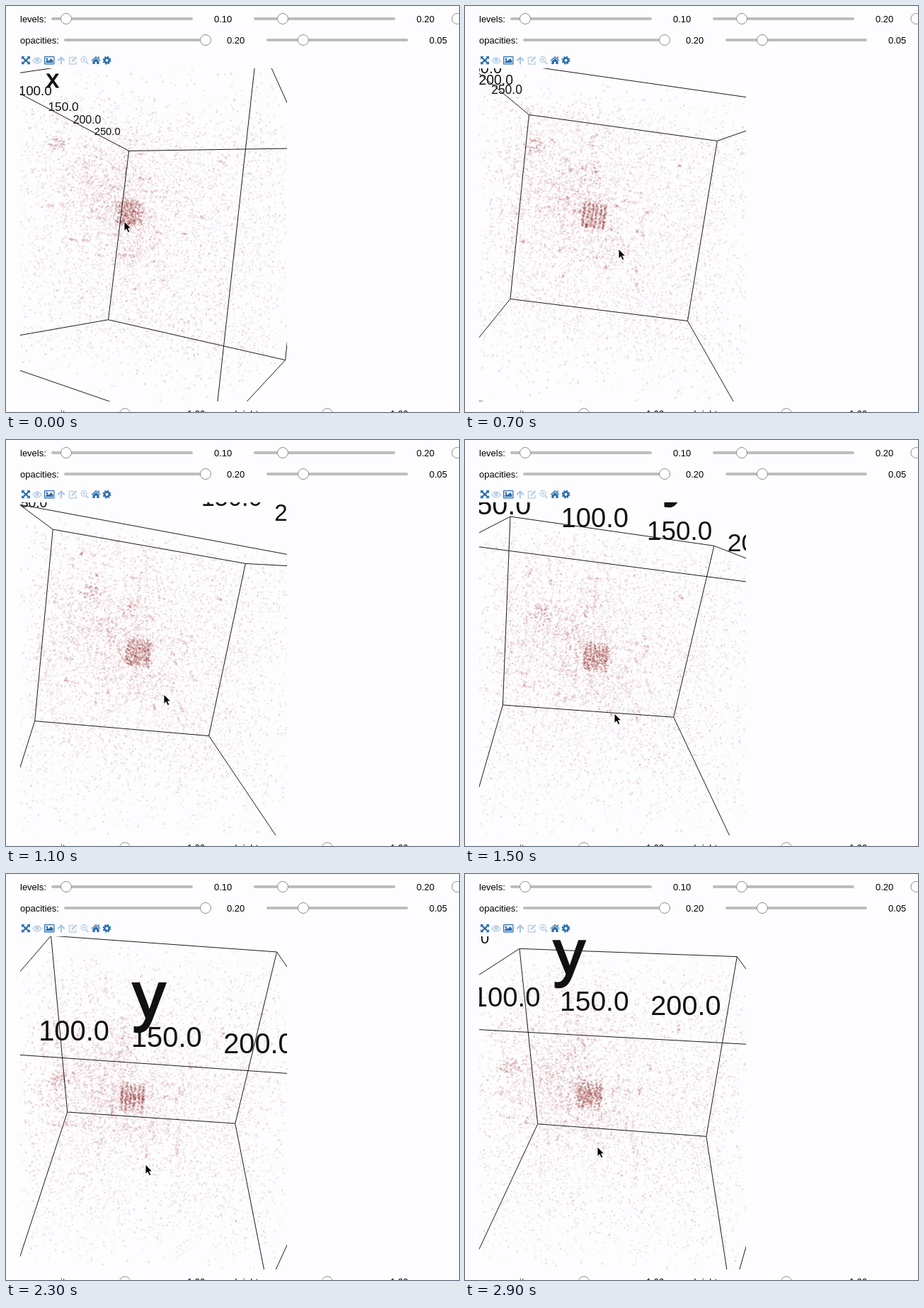
Recreate the animation shown at these times as an HTML page with a canvas. Size 640 by 573 pixels, loop 3000 ms.

```html
<!DOCTYPE html>
<html lang="en">
<head>
<meta charset="utf-8">
<title>Volume viewer</title>
<style>
html, body { margin: 0; width: 640px; height: 573px; overflow: hidden; background: #fdfcfe; }
canvas, svg { position: absolute; left: 0; top: 0; display: block; }
text { font-family: "Liberation Sans", Arial, sans-serif; }
.ui text { font-size: 13px; fill: #000; }
.title { stroke: #111; stroke-width: .03em; }
</style>
</head>
<body>
<canvas id="cloud" width="640" height="573"></canvas>
<svg id="stage" width="640" height="573" viewBox="0 0 640 573">
  <clipPath id="view"><rect x="20" y="88" width="377" height="470"/></clipPath>
  <g id="ui" class="ui"></g>
  <g id="icons" fill="#2a6fb0" stroke="none">
    <path d="M22 71h4.5l-1.4 1.4 2.9 2.9 2.9-2.9L29.500 71H34v4.500l-1.400-1.400-2.900 2.600 2.900 2.700L34 78v4.300h-4.500l1.400-1.400-2.900-2.700-2.900 2.700 1.400 1.400H22V78l1.400 1.400 2.900-2.700-2.900-2.600L22 75.500z"/>
    <g fill="none" stroke="#bcd2e8" stroke-width="1.5">
      <path d="M38 77q6-8 12 0q-6 8-12 0z"/><circle cx="44" cy="76.500" r="2" fill="#bcd2e8"/>
    </g>
    <path fill-rule="evenodd" d="M55 71h12.500q1 0 1 1v9.500q0 1-1 1H55q-1 0-1-1V72q0-1 1-1zM55.300 72.300v9h12v-9zM56.300 80.300v-2l2.300-2.300 1.500 1.500 3.500-3.500 2.800 2.800v3.500zM56.500 75a1.400 1.400 0 1 0 2.800 0a1.400 1.400 0 1 0-2.800 0z"/>
    <path fill="#a9c6e2" d="M78 71l5.500 5.500-1.500 1.500-3-2.800V82.500h-2V75.200L74 78l-1.500-1.500z"/>
    <g fill="none" stroke="#bcd2e8" stroke-width="1.400">
      <path d="M96 72.500H89.500v9.500H99V78"/><path d="M93 78.500l6.500-6.500" stroke-width="2.500"/>
      <circle cx="110" cy="75.500" r="4"/><path d="M108 75.500h4M110 73.500v4"/><path d="M113 78.500l3.500 3.500" stroke-width="2.200"/>
    </g>
    <path d="M127 71l6.500 5.700-.8.900L127 72.800l-5.700 4.800-.8-.9zM130 71.500h1.700v3l-1.700-1.500zM127 73.800l4.600 3.900V82h-3.300v-3.300h-2.600V82h-3.300v-4.300z"/>
    <circle cx="142.500" cy="76.700" r="3.300" fill="none" stroke="#2a6fb0" stroke-width="2.700"/>
    <circle cx="142.500" cy="76.700" r="5.100" fill="none" stroke="#2a6fb0" stroke-width="1.700" stroke-dasharray="2.200 1.805"/>
  </g>
  <g clip-path="url(#view)">
    <g id="labels" fill="#111" text-anchor="middle"></g>
    <path id="box" fill="none" stroke="#1c1c1c" stroke-width="1"/>
  </g>
  <path id="cursor" d="M0 0V13.500L3.100 10.700 5.400 15.700 7.800 14.600 5.600 9.800H9.700z" fill="#000" stroke="#fff" stroke-width="0.900"/>
</svg>
<script>
const SVG = 'http://www.w3.org/2000/svg';
const $ = id => document.getElementById(id);

function add(parent, tag, attrs, text) {
  const el = document.createElementNS(SVG, tag);
  for (const k in attrs) el.setAttribute(k, attrs[k]);
  if (text) el.textContent = text;
  parent.append(el);
  return el;
}

// Control rows
const ui = $('ui');
const word = (x, y, s, anchor = 'start') => add(ui, 'text', { x, y, 'text-anchor': anchor }, s);
function slider(y, x1, x2, knob) {
  add(ui, 'path', { d: `M${x1 + 2} ${y}H${x2 - 2}`, stroke: '#bdbdbd', 'stroke-width': 4, 'stroke-linecap': 'round' });
  add(ui, 'circle', { cx: knob, cy: y, r: 7.5, fill: '#fff', stroke: '#8e8e8e' });
}
word(20, 23, 'levels:');
slider(18, 64, 264, 85);
word(294, 23, '0.10');
slider(18, 350, 550, 391);
word(580, 23, '0.20');
slider(18, 630, 830, 637.5);
word(20, 53, 'opacities:');
slider(48, 82, 283, 282);
word(312, 53, '0.20');
slider(48, 368, 568, 420);
word(598, 53, '0.05');
word(90, 580, 'opacity', 'end');
slider(575.5, 100, 247, 168);
word(256, 580, '1.00');
word(356, 580, 'bright', 'end');
slider(575.5, 366, 534, 454);
word(543, 580, '1.00');

// Camera: the unit cube turns about its centre
const CX = 208.5, CY = 322.3, FOCAL = 563, DIST = 1.668, LOOP = 3000, STEP = 100;

// time, right axis, up axis, pointer
const KEYS = [
  [0, .878, .0862, -.4735, .118, -.991, .038, 167, 304],
  [700, .991, .129, .0315, .1315, -.9825, -.1335, 217, 343],
  [1100, .974, .1136, .1944, .158, -.956, -.2455, 223, 359],
  [1500, .983, .0874, .1557, .137, -.9086, -.3944, 211, 386],
  [1900, .996, .071, .06, .0896, -.834, -.545, 202, 401],
  [2300, .9976, .068, .009, .0614, -.791, -.6086, 197, 410],
  [2900, .9936, .068, -.084, .0102, -.85, -.5265, 187, 385]
];

function slope(i, k) {
  const a = KEYS[Math.max(0, i - 1)], b = KEYS[Math.min(KEYS.length - 1, i + 1)];
  return (b[k] - a[k]) / (b[0] - a[0]);
}

function sample(t) {
  let i = 0;
  while (i < KEYS.length - 2 && t >= KEYS[i + 1][0]) i++;
  const a = KEYS[i], b = KEYS[i + 1], h = b[0] - a[0], s = (t - a[0]) / h;
  const s2 = s * s, s3 = s2 * s;
  return a.map((v, k) => v * (2 * s3 - 3 * s2 + 1) + b[k] * (3 * s2 - 2 * s3)
    + h * (slope(i, k) * (s3 - 2 * s2 + s) + slope(i + 1, k) * (s3 - s2)));
}

const dot = (a, b) => a[0] * b[0] + a[1] * b[1] + a[2] * b[2];
const unit = a => a.map(v => v / Math.hypot(...a));

function camera(p) {
  const X = unit(p.slice(1, 4)), up = p.slice(4, 7), d = dot(X, up);
  const Y = unit(up.map((v, i) => v - d * X[i]));
  const N = [X[1] * Y[2] - X[2] * Y[1], X[2] * Y[0] - X[0] * Y[2], X[0] * Y[1] - X[1] * Y[0]];
  return (a, b, c) => {
    const z = DIST + a * X[2] + b * Y[2] + c * N[2], f = FOCAL / z;
    return [CX + f * (a * X[0] + b * Y[0] + c * N[0]), CY + f * (a * X[1] + b * Y[1] + c * N[1]), z];
  };
}

// Box edges
const edges = [];
for (let axis = 0; axis < 3; axis++)
  for (const u of [-.5, .5])
    for (const v of [-.5, .5])
      edges.push([-.5, .5].map(w => {
        const p = [u, v];
        p.splice(axis, 0, w);
        return p;
      }));

// Axis labels; drop is the baseline shift in em
const labels = [];
function label(kind, text, pos, size, drop) {
  labels.push({ pos, size, drop, el: add($('labels'), 'text', { class: kind }, text) });
}
for (let v = 50; v <= 250; v += 50) {
  const name = v.toFixed(1);
  label('tick', name, [.011 + (v - 150) * .004, .605, .553], 34.3, .358);
  label('tick', name, [-.6, .592, -.014 - (v - 150) * .00386], 34.3, .358);
}
label('title', 'y', [-.029, .695, .615], 70, .155);
label('title', 'x', [-.65, .708, .03], 70, .26);

// Seeded point cloud
let seed = 20;
function rnd() {
  seed = (seed + 0x6D2B79F5) | 0;
  let r = Math.imul(seed ^ seed >>> 15, 1 | seed);
  r = r + Math.imul(r ^ r >>> 7, 61 | r) ^ r;
  return ((r ^ r >>> 14) >>> 0) / 4294967296;
}
const side = () => rnd() - .5;
const gauss = () => (rnd() + rnd() + rnd() + rnd() - 2) * 1.73;

const groups = [];
let group;
function tone(color) {
  groups.push(group = { color, pts: [] });
}
function put(p) {
  if (p.every(v => Math.abs(v) < .5)) group.pts.push(p);
}
function blob(n, mid, sd) {
  while (n--) put(mid.map((m, i) => m + sd[i] * gauss()));
}
function streak(n, mid, axis, len) {
  while (n--) put(mid.map((m, i) => m + (i === axis ? len * side() : .003 * gauss())));
}

for (const [color, n] of [['rgba(165,125,127,.12)', 3200], ['rgba(175,115,117,.18)', 1900], ['rgba(170,100,102,.26)', 450]]) {
  tone(color);
  for (let i = 0; i < n; i++) put([side(), side(), side()]);
}

tone('rgba(180,90,90,.18)');
blob(480, [-.28, .2, .12], [.15, .15, .2]);
blob(330, [-.17, .12, .1], [.08, .07, .13]);
blob(150, [-.04, -.03, .08], [.05, .06, .09]);
for (let i = 0; i < 60; i++)
  streak(12, [-.14 + .18 * gauss(), .1 + .17 * gauss(), .06 + .19 * gauss()], Math.floor(rnd() * 3), .05 + .09 * rnd());

tone('rgba(160,65,68,.24)');
blob(55, [-.3, .3, .31], [.017, .013, .017]);
blob(40, [-.16, .17, .08], [.05, .05, .06]);

// Striped core
tone('rgba(145,50,53,.24)');
for (let i = 0; i < 440; i++) {
  const col = Math.floor(rnd() * 6) - 2.5, row = Math.floor(rnd() * 6) - 2.5;
  put([-.085 + col * .0165 + .003 * gauss(), .074 + row * .0165 + .005 * gauss(), .075 + .09 * side()]);
}

const ctx = $('cloud').getContext('2d');
ctx.beginPath();
ctx.rect(20, 88, 377, 470);
ctx.clip();

function draw(t) {
  const pose = sample(t), view = camera(pose);
  ctx.clearRect(0, 0, 640, 573);
  for (const g of groups) {
    ctx.fillStyle = g.color;
    for (const p of g.pts) {
      const [x, y, z] = view(...p), s = Math.min(3, 1.2 + 1.4 / z);
      ctx.fillRect(x - s / 2, y - s / 2, s, s);
    }
  }
  $('box').setAttribute('d', edges.map(([a, b]) => {
    const p = view(...a), q = view(...b);
    return `M${p[0].toFixed(2)} ${p[1].toFixed(2)}L${q[0].toFixed(2)} ${q[1].toFixed(2)}`;
  }).join(''));
  for (const { el, pos, size, drop } of labels) {
    const [x, y, z] = view(...pos), em = size / z;
    el.setAttribute('x', x.toFixed(2));
    el.setAttribute('y', (y + drop * em).toFixed(2));
    el.setAttribute('font-size', em.toFixed(2));
  }
  $('cursor').setAttribute('transform', `translate(${pose[7].toFixed(1)} ${pose[8].toFixed(1)})`);
}

const start = performance.now();
let shown = -1;
function tick() {
  const step = Math.floor(((performance.now() - start + 2) % LOOP) / STEP);
  if (step !== shown) draw((shown = step) * STEP);
  requestAnimationFrame(tick);
}
tick();
</script>
</body>
</html>
```
